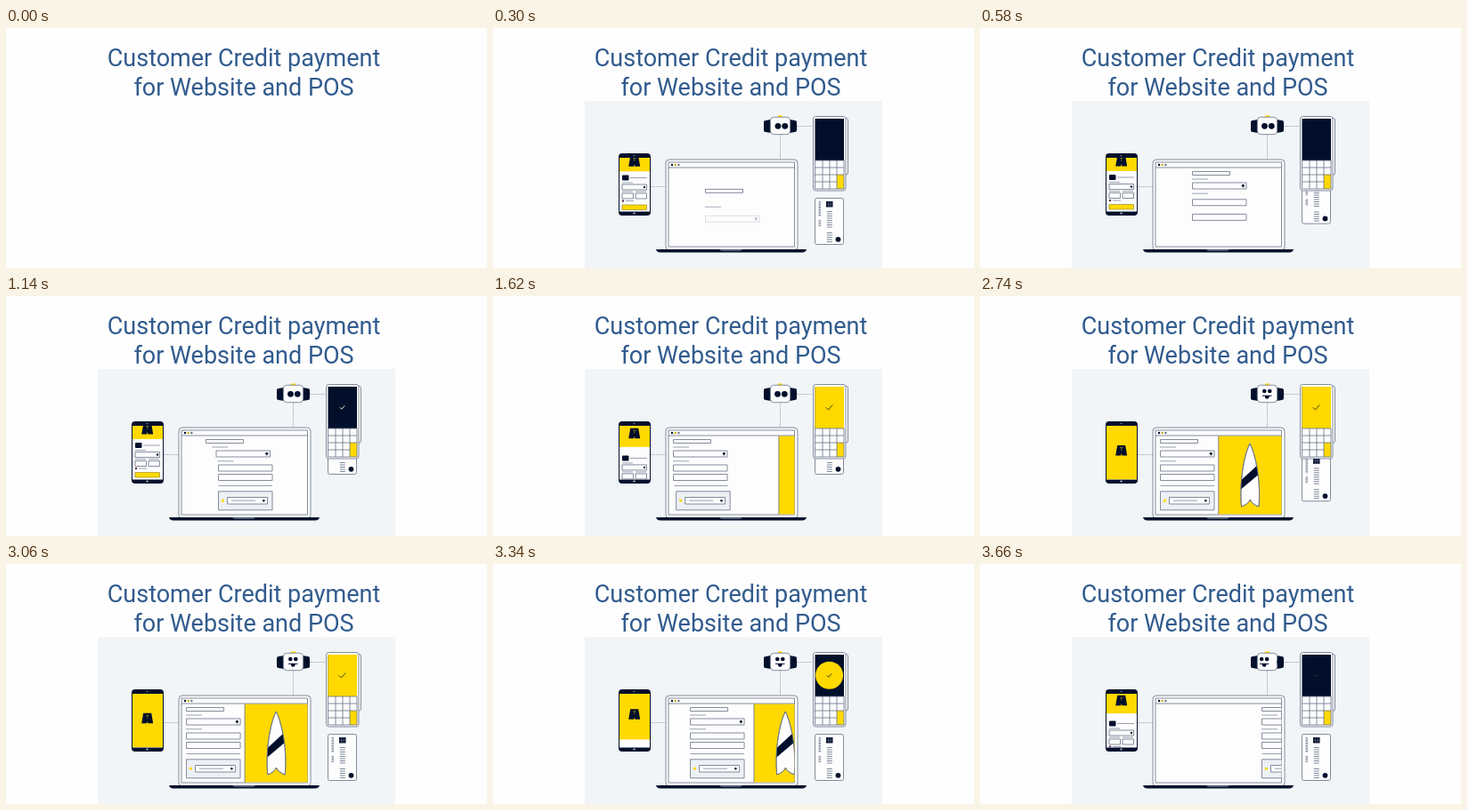
Recreate the animation shown at these times as an HTML page. Size 540 by 270 pixels, loop 3700 ms.

```html
<!DOCTYPE html>
<html lang="en">
<head>
<meta charset="utf-8">
<title>Customer Credit payment</title>
<style>
  html, body { margin: 0; width: 100%; height: 100%; overflow: hidden; background: #fefefe; }
  svg { display: block; width: 540px; height: 270px; }
  text { font: 400 27px Roboto, sans-serif; fill: #315b8e; text-anchor: middle; }
  .navy { fill: #020f2b; }
  .yellow { fill: #ffd900; }
  .paper { fill: #fdfdfe; }
  .line { fill: none; stroke: #667084; stroke-width: .8; }
  .box { fill: #fdfdfe; stroke: #667084; stroke-width: .8; }
  .soft { fill: none; stroke: #8d96a5; stroke-width: .9; }
  .dash { fill: none; stroke: #98a1ae; stroke-dasharray: 1 1; }
</style>
</head>
<body>
<svg viewBox="0 0 540 270">
  <defs>
    <clipPath id="phoneClip"><path d="M142 146h34v60.500h-34z"/></clipPath>
    <clipPath id="pageClip"><path d="M197.500 157.500h141v88h-141z"/></clipPath>
    <clipPath id="displayClip"><path d="M361.500 102h32.500v47h-32.500z"/></clipPath>
    <clipPath id="watchClip"><rect x="311.500" y="100.500" width="22" height="19" rx="4"/></clipPath>
    <clipPath id="cardClip"><path d="M355 183h50v70h-50z"/></clipPath>
    <path id="boardShape" d="M303 166C310 180 315.500 210 313 237Q305 234 303.200 229Q301.500 234 293.500 237C291 210 296 180 303 166z"/>
    <clipPath id="boardClip"><use href="#boardShape"/></clipPath>
  </defs>

  <text x="267" y="43">Customer Credit payment</text>
  <text x="267" y="76">for Website and POS</text>

  <g id="scene">
    <path fill="#f1f5f8" d="M103 82h334v188H103z"/>
    <path class="dash" d="M177 178.500h17M322.500 120v28M341 110.500h18"/>

    <!-- phone -->
    <rect class="navy" x="141" y="141" width="36" height="70" rx="4"/>
    <circle cx="158.500" cy="143.500" r=".8" fill="#8d96a8"/>
    <circle cx="158.500" cy="208.500" r="1.100" fill="#c3cad6"/>
    <g clip-path="url(#phoneClip)">
      <path class="paper" d="M142 146h34v61h-34z"/>
      <g id="phoneForm">
        <rect class="navy" x="145" y="165" width="7.500" height="6" rx="1"/>
        <path class="soft" d="M154 168h19M145 173.500h12M145 183.500h12M160 183.500h12M149 194h9"/>
        <path class="box" d="M145 175.500h27.500v6H145zM145 185.500h12.500v6H145zM160 185.500h12.500v6H160z"/>
        <circle class="navy" cx="170" cy="178.500" r="1.200"/>
        <circle cx="146" cy="194" r="1.200" fill="#5b2b45"/>
        <path class="yellow" stroke="#8b7a20" stroke-width=".6" d="M145 198.500h27.500v5.500H145z"/>
      </g>
      <rect class="yellow" id="cover" x="142" y="146" width="34" height="60.500"/>
      <g id="shorts">
        <path class="navy" d="M154.200 168h9l2 11.500h-5.800l-.6-2.500-.6 2.500h-6z"/>
        <path d="M157 170.500h3.500M158.800 170.500v3.500" stroke="#b59c10" stroke-width=".6"/>
      </g>
    </g>

    <!-- laptop -->
    <rect class="box" x="194" y="148" width="148" height="102" rx="4"/>
    <path class="box" d="M197 151h141.500v95H197zM197 157h141.500"/>
    <circle class="navy" cx="201" cy="154" r="1.200"/>
    <circle cx="204.700" cy="154" r="1.200" fill="#c9a900"/>
    <circle cx="208.400" cy="154" r="1.200" fill="#6b7485"/>
    <g clip-path="url(#pageClip)">
      <g class="row"><path class="box" d="M202.500 161.500h42v4h-42z"/></g>
      <g class="row"><path class="soft" d="M202 170h18"/></g>
      <g class="row">
        <path class="box" d="M202.500 174h60.500v7h-60.500z"/>
        <path class="navy" d="M259.300 179.800l-1.500-2.500a1.500 1.500 0 1 1 3 0z"/>
      </g>
      <g class="row"><path class="soft" d="M202 185.800h18"/></g>
      <g class="row"><path class="box" d="M202.500 190h60.500v7h-60.500z"/></g>
      <g class="row"><path class="box" d="M202.500 200.500h60.500v7h-60.500z"/></g>
      <g class="row"><path class="soft" d="M202.500 213.500h60.500"/></g>
      <g class="row">
        <path class="line" style="fill:#edf0f5" d="M202.500 219.800h60.500v21h-60.500z"/>
        <path class="box" d="M212.500 226.500h45v7.500h-45z"/>
        <circle class="yellow" cx="207.500" cy="230.200" r="1.600"/>
        <path class="soft" d="M217 230.200h27"/>
        <circle class="navy" cx="253.300" cy="230.200" r="1.200"/>
      </g>
      <g id="product">
        <path class="yellow" stroke="#667084" stroke-width=".8" d="M267.800 157h73v90h-73z"/>
        <use href="#boardShape" class="box"/>
        <path class="navy" clip-path="url(#boardClip)" d="M290 210L315 187v12L290 220z"/>
        <use href="#boardShape" class="line"/>
      </g>
    </g>
    <path class="navy" d="M183 249h169q-1 3.500-5 3.500H188q-4 0-5-3.500z"/>
    <path fill="#6d7788" d="M254 249.300h26q-1 1.400-3 1.400h-20q-2 0-3-1.400z"/>

    <!-- watch -->
    <path class="navy" d="M312 103l-6 1q-2 0-2 2v9q0 2 2 2l6 1zM333 103l6 1q2 0 2 2v9q0 2-2 2l-6 1z"/>
    <path class="yellow" d="M320 98.500h5v2h-5z"/>
    <rect class="box" x="311.300" y="100.300" width="22.400" height="19.400" rx="4"/>
    <g clip-path="url(#watchClip)">
      <g id="rings" class="navy">
        <circle cx="319.500" cy="110.300" r="3.400"/><circle cx="327.300" cy="110.300" r="3.400"/>
      </g>
      <g id="smiley" class="navy">
        <circle cx="319.300" cy="107" r="2.300"/><circle cx="325.300" cy="107" r="2.300"/>
        <path d="M317 111.800h10.500v1h-2.800q0 3-2.400 3t-2.400-3H317z"/>
      </g>
    </g>

    <!-- bank card -->
    <g clip-path="url(#cardClip)">
      <g id="card">
        <rect class="box" x="361.500" y="191.500" width="32" height="52" rx="2"/>
        <path class="navy" d="M374 195h7.500v6.500H374z"/>
        <path d="M376.500 195v7M379 195v7M374 198.300h7.500" stroke="#8d96a5" stroke-width=".4"/>
        <path d="M366.800 195v17M366.800 216v7" stroke="#8d96a5" stroke-width="2.600" stroke-dasharray="1 .5"/>
        <path d="M377.800 206v20M377.800 230v11" stroke="#7d8798" stroke-width="6" stroke-dasharray="1 1.500"/>
        <circle class="navy" cx="387.500" cy="237.800" r="2.900"/>
      </g>
    </g>

    <!-- terminal -->
    <rect class="box" x="362" y="101.500" width="36.500" height="63.500" rx="2"/>
    <rect class="box" x="359.500" y="99.500" width="36.500" height="83.500" rx="3"/>
    <path class="navy" d="M361.500 102H394v47h-32.500z"/>
    <g clip-path="url(#displayClip)">
      <circle class="yellow" id="glow" cx="377.600" cy="125.300"/>
      <path id="check" fill="none" stroke-linecap="round" vector-effect="non-scaling-stroke" d="M-3.500 .3l2.500 2.500L3.500-2.500"/>
    </g>
    <path class="yellow" d="M386 165h8v16h-8z"/>
    <path class="line" d="M361.500 149H394v32h-32.500zM370 149v32M378 149v32M386 149v32M361.500 157H394M361.500 165H394M361.500 173H386"/>
  </g>
</svg>
<script>
const LOOP = 3700, INTRO = 100, STEP = 40;
const $ = id => document.getElementById(id);
const rows = [...document.querySelectorAll('.row')];

// Cubic ease in and out, from 0 to 1
function ease(t, start, duration) {
  const p = Math.min(1, Math.max(0, (t - start) / duration));
  return p < .5 ? 4 * p ** 3 : 1 - 4 * (1 - p) ** 3;
}

function move(el, x, y = 0) {
  el.setAttribute('transform', `translate(${x} ${y})`);
}

function draw(t) {
  $('scene').setAttribute('visibility', t < INTRO ? 'hidden' : 'visible');
  // Closing moves run on past the end of the loop
  const late = t < 700 ? t + LOOP - INTRO : t;
  const leaving = late > 2900;

  const form = leaving ? ease(late, 2938, 1092) : 1 - ease(t, 1200, 1150);
  $('cover').setAttribute('height', 60.5 - 45.5 * form);
  move($('phoneForm'), 0, 74 * (1 - form));
  move($('shorts'), 0, -24 * form);

  rows.forEach((row, i) => {
    const rise = ease(t, i < 6 ? 107 + 47 * i : 300 + 50 * i, 385);
    const left = ease(t, 910 + 50 * i, 500);
    move(row, 36 * (1 - left) + 140 * ease(t, 3012, 1012), 40 * (1 - rise));
    row.setAttribute('opacity', Math.min(1, rise * 4));
  });
  move($('product'), 73 * (1 - ease(t, 1150, 1150)) + 140 * ease(t, 2980, 1012));

  const smile = leaving ? -20 * ease(late, 3490, 500) : 20 * (1 - ease(t, 1726, 600));
  move($('smiley'), smile);
  move($('rings'), leaving ? smile + 20 : smile - 20);

  move($('card'), 0, 43 * (ease(t, 2392, 600) - ease(t, 271, 600)));

  const radius = 31 * (ease(t, 1160, 440) - ease(t, 3100, 480));
  const scale = ease(t, 1000, 240) - ease(t, 3080, 640);
  $('glow').setAttribute('r', radius);
  $('check').setAttribute('transform', `translate(377.5 125.3) scale(${scale})`);
  $('check').setAttribute('stroke', scale <= 0 ? 'none' : radius < 4 ? '#e8e4c4' : '#4d4518');
}

function tick() {
  const t = performance.now() % LOOP;
  draw(t < INTRO ? t : INTRO + STEP * Math.floor((t - INTRO) / STEP));
  requestAnimationFrame(tick);
}
tick();
</script>
</body>
</html>
```
